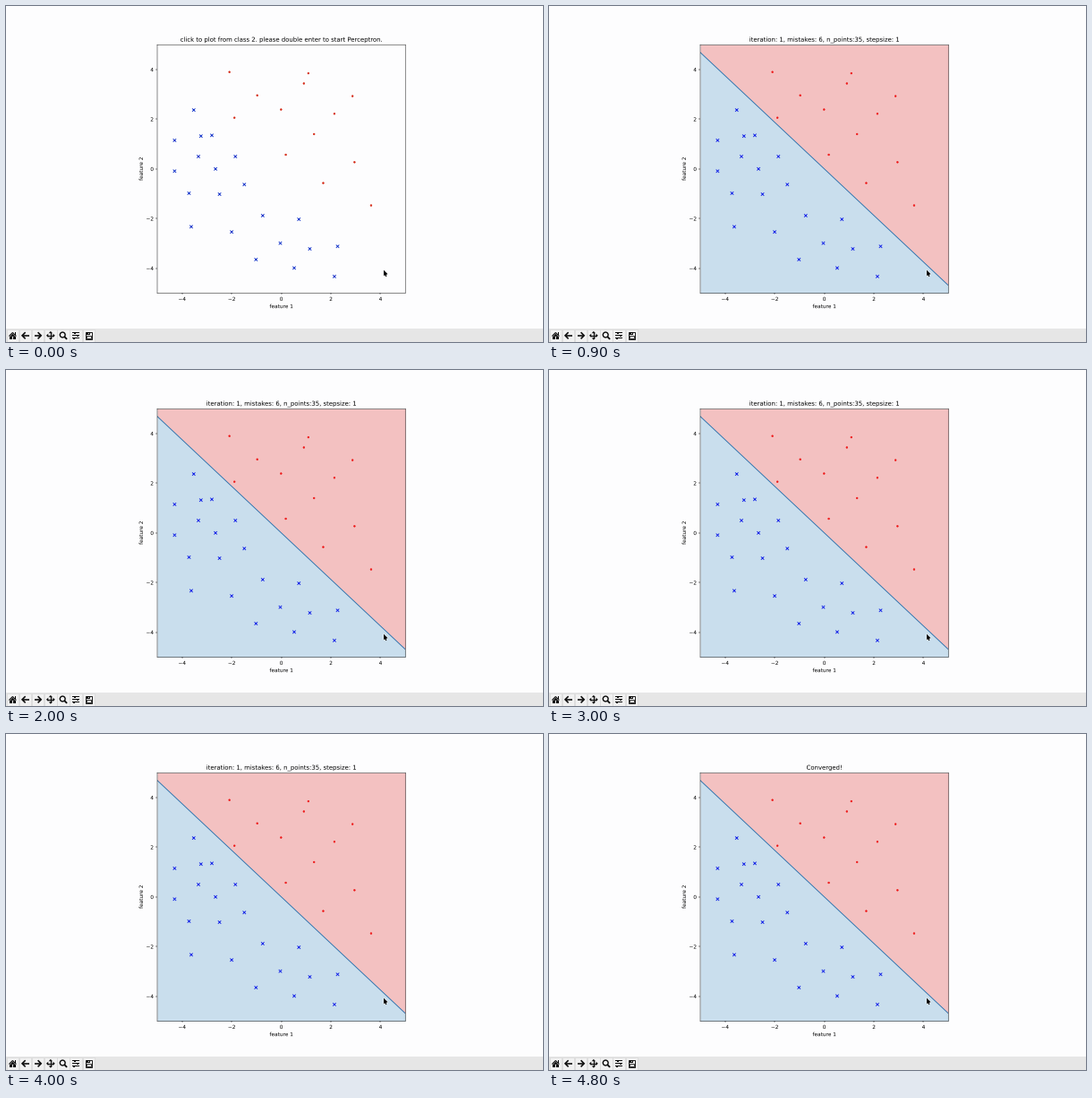
A matplotlib script that plays this animation: 600 px wide and 375 px high, repeating every 5000 ms.

```python
import numpy as np
import matplotlib.pyplot as plt
from matplotlib.animation import FuncAnimation
from matplotlib.patches import Circle, Polygon, Rectangle
from matplotlib.patheffects import Normal
from matplotlib.text import Text

W, H, DPI = 600, 375, 100
K = 5 / 12          # interface scale
PX = 72 / DPI       # points per pixel
FRAMES, STEP = 50, 100
START, DONE = 9, 48

PAPER, BAR, BUTTON, RIM, INK = "#fdfdfe", "#e6e6e6", "#f1f1f1", "#d2d2d2", "#0a0a0a"

plt.rcParams.update({
    "toolbar": "None",
    "font.family": "DejaVu Sans",
    "font.size": 10 * K,
    "text.hinting": "none",
    "figure.facecolor": PAPER,
    "savefig.facecolor": PAPER,
    "axes.facecolor": PAPER,
    "axes.linewidth": 0.8 * K,
    "axes.labelpad": 4 * K,
    "axes.titlepad": 6 * K,
})
for axis in ("xtick", "ytick"):
    plt.rcParams[axis + ".major.size"] = 3.5 * K
    plt.rcParams[axis + ".major.pad"] = 3.5 * K
    plt.rcParams[axis + ".major.width"] = 0.8 * K

# Hand-clicked training points
CLASS1 = np.array([
    (-3.53, 2.37), (-4.30, 1.15), (-3.24, 1.32), (-2.80, 1.35), (-3.34, 0.50),
    (-1.85, 0.50), (-4.30, -0.09), (-2.65, 0.00), (-3.72, -0.98),
    (-2.49, -1.02), (-1.49, -0.63), (-3.63, -2.33), (-2.00, -2.54),
    (-0.75, -1.88), (0.71, -2.03), (-1.02, -3.65), (-0.04, -2.99),
    (1.15, -3.22), (2.27, -3.12), (0.52, -3.99), (2.14, -4.33),
])
CLASS2 = np.array([
    (-2.09, 3.90), (-0.97, 2.96), (-1.89, 2.06), (-0.01, 2.39), (0.91, 3.44),
    (1.09, 3.85), (2.87, 2.93), (2.14, 2.22), (1.32, 1.40), (0.18, 0.57),
    (2.95, 0.27), (1.69, -0.57), (3.62, -1.47),
])
SLOPE, LIM = -0.938, 5

fig = plt.figure(figsize=(W / DPI, H / DPI), dpi=DPI)

# Plot
SIDE = 277.2
ax = fig.add_axes([169 / W, 54.6 / H, SIDE / W, SIDE / H])
ax.set(xlim=(-LIM, LIM), ylim=(-LIM, LIM), xticks=range(-4, 5, 2),
       yticks=range(-4, 5, 2), xlabel="feature 1", ylabel="feature 2")
ax.spines[:].set_snap(False)
title = ax.set_title("", fontsize=11.9 * K)

ends = np.array([-LIM, LIM])
regions = [ax.fill_between(ends, SLOPE * ends, side, color=color, lw=0, zorder=0.2)
           for side, color in ((-LIM, "#c9deed"), (LIM, "#f3c1c1"))]
border, = ax.plot(ends, SLOPE * ends, color="#1f6cab", lw=1.5 * K, zorder=0.8)
crosses = ax.scatter(*CLASS1.T, s=36 * K**2, marker="x", lw=1.5 * K)
dots = ax.scatter(*CLASS2.T, s=36 * K**2, marker=".", lw=K)

# Window overlay in pixels, y pointing down
ui = fig.add_axes([0, 0, 1, 1], zorder=5)
ui.set(xlim=(0, W), ylim=(H, 0))
ui.axis("off")


def box(x, y, w, h, color=INK, edge="none", lw=0):
    """Rectangle centred on x, y."""
    ui.add_patch(Rectangle((x - w / 2, y - h / 2), w, h, fc=color, ec=edge, lw=lw * PX))


def stroke(xs, ys, width, color=INK):
    ui.plot(xs, ys, color=color, lw=width * PX, solid_capstyle="butt",
            solid_joinstyle="miter")


def chevron(x, y, dx, dy, width):
    """Right-angled bracket with its tip pointing along dx, dy."""
    stroke([x - dx - dy, x, x - dx + dy], [y - dy - dx, y, y - dy + dx], width)


def home(x, y):
    chevron(x, y - 3.3, 0, -4, 1.1)
    ui.add_patch(Polygon([(x - 3.2, y + 1), (x, y - 2), (x + 3.2, y + 1)], fc=INK, lw=0))
    for side in (-1, 1):
        box(x + 2.05 * side, y + 2.4, 2.3, 3.0)
    box(x, y + 1, 2, 0.6)
    box(x + 2.7, y - 2.4, 1.1, 2.4)


def arrow(x, y, d):
    chevron(x + 3.5 * d, y, 3.6 * d, 0, 1.6)
    stroke([x - 4.2 * d, x + 3.4 * d], [y, y], 1.6)


def move(x, y):
    for dx, dy in ((1, 0), (0, 1), (-1, 0), (0, -1)):
        stroke([x, x + 3.5 * dx], [y, y + 3.5 * dy], 1.3)
        tip, base, half = 4.9, 2.6, 2.1
        ui.add_patch(Polygon([
            (x + tip * dx, y + tip * dy),
            (x + base * dx - half * dy, y + base * dy + half * dx),
            (x + base * dx + half * dy, y + base * dy - half * dx)], fc=INK, lw=0))


def zoom(x, y):
    ui.add_patch(Circle((x - 0.8, y - 0.8), 2.9, fc="none", ec=INK, lw=1.4 * PX))
    stroke([x + 1.2, x + 4.1], [y + 1.2, y + 4.1], 1.8)


def sliders(x, y):
    for row, knob in zip((-3, 0, 3), (-1.2, 2, -2)):
        box(x, y + row, 8.6, 0.9)
        box(x + knob, y + row, 1.6, 2.2)


def save(x, y):
    box(x, y, 7.4, 7.4, "none", INK, 0.9)
    box(x - 0.3, y - 2.3, 4, 2.6)
    box(x + 0.6, y - 2.3, 0.9, 1.6, BUTTON)
    box(x, y + 2, 4.4, 2.8, "none", INK, 0.8)


box(W / 2, H - 7.5, W, 15, BAR)
tools = [home, lambda x, y: arrow(x, y, -1), lambda x, y: arrow(x, y, 1),
         move, zoom, sliders, save]
for i, icon in enumerate(tools):
    x, y = 7.4 + 14.15 * i, 367.8
    box(x, y, 13.4, 13.4, BUTTON, RIM, 0.5)
    icon(x, y)


def pointer(x, y, size):
    head = [(x, y), (x, y + size), (x + 0.71 * size, y + 0.71 * size)]
    tail = [x + 0.2 * size, x + 0.45 * size], [y + 0.5 * size, y + 1.15 * size]
    ui.add_patch(Polygon(head, fc="white", ec="white", lw=0.8 * PX, zorder=3))
    for color, width in (("white", 2), ("black", 1.2)):
        stroke(*tail, width, color)
        ui.lines[-1].set_zorder(4)
    ui.add_patch(Polygon(head, fc="black", lw=0, zorder=5))


pointer(422, 294.7, 6.3)

# Outlined text and markers keep their exact subpixel places
for part in fig.findobj(Text) + [crosses, dots]:
    part.set_path_effects([Normal()])


def update(i):
    trained = i >= START
    for part in (*regions, border):
        part.set_visible(trained)
    crosses.set_color("#0c1ce8" if trained else "#0a2cc8")
    dots.set_color("#ee1414" if trained else "#d42410")
    if i >= DONE:
        title.set_text("Converged!")
    elif trained:
        title.set_text(f"iteration: 1, mistakes: 6, n_points:{len(CLASS1) + len(CLASS2) + 1}, stepsize: 1")
    else:
        title.set_text("click to plot from class 2. please double enter to start Perceptron.")
    return (*regions, border, crosses, dots, title)


anim = FuncAnimation(fig, update, frames=FRAMES, interval=STEP,
                     init_func=lambda: update(0), repeat=True, repeat_delay=0)
plt.show()
```
